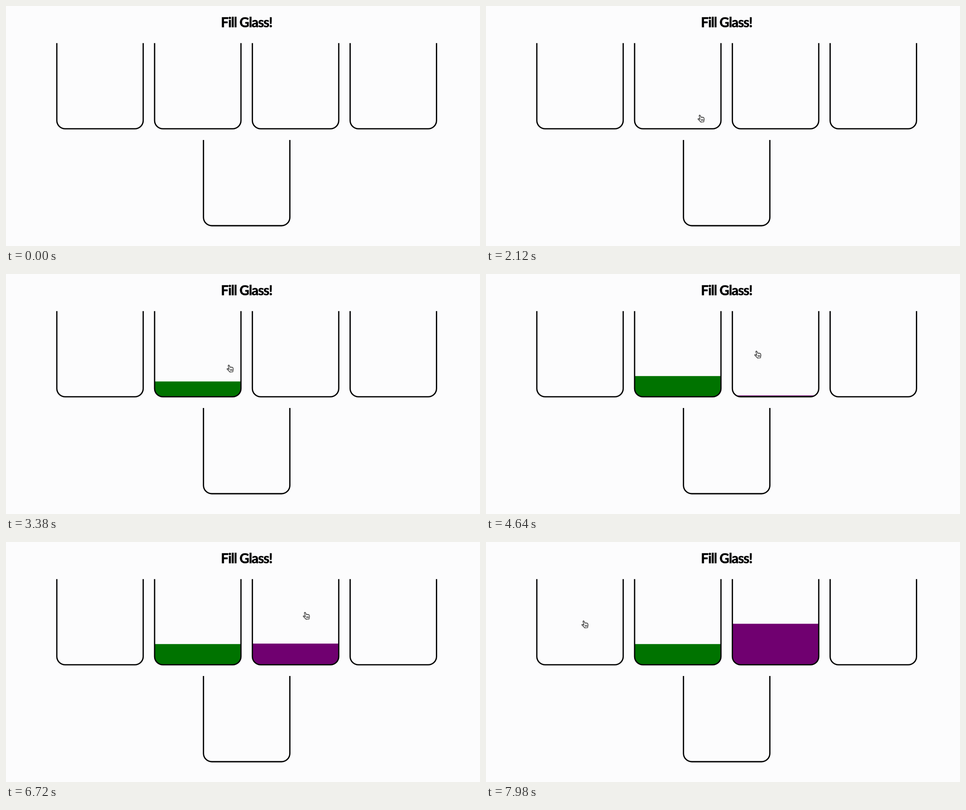
Animation of 1053 by 532 pixels, one loop 8000 ms. Source, as an HTML page:

```html
<!DOCTYPE html>
<html lang="en">
<head>
<meta charset="utf-8">
<title>Fill Glass!</title>
<style>
  html, body { margin: 0; width: 100%; height: 100%; overflow: hidden; background: #fcfcfd; }
  svg { display: block; width: 1053px; height: 532px; }
  .title {
    font: 700 30px Lato, "Open Sans", sans-serif;
    letter-spacing: -1.1px;
    text-anchor: middle;
    stroke: #000;
    stroke-width: .7px;
  }
  .glass { fill: none; stroke: #000; stroke-width: 2.8px; }
  .liquid, .hand { animation: 8s linear infinite; }
  .green { fill: #007300; animation-name: pour-green; }
  .purple { fill: #700070; animation-name: pour-purple; }
  .hand {
    fill: #fff;
    stroke: #000;
    stroke-width: 1.15px;
    stroke-linejoin: round;
    stroke-linecap: round;
    animation-name: wander;
  }

  @keyframes pour-green {
    0%, 33.4% { transform: translateY(0); }
    42.25% { transform: translateY(-34px); }
    45.5%, 100% { transform: translateY(-46px); }
  }
  @keyframes pour-purple {
    0%, 57.4% { transform: translateY(0); }
    58% { transform: translateY(-3px); }
    66.75% { transform: translateY(-40px); }
    68.5%, 83.8% { transform: translateY(-46px); }
    84% { transform: translateY(-47px); }
    94.5%, 100% { transform: translateY(-91px); }
  }
  @keyframes wander {
    0%, 15.9% { transform: translate(642px, 534px); }
    26% { transform: translate(476px, 254px); }
    26.5%, 27.5% { transform: translate(470px, 241px); }
    31.5%, 33.5% { transform: translate(447px, 193px); }
    42.25% { transform: translate(490px, 201px); }
    43.5% { transform: translate(500px, 199px); }
    52.75%, 59.25% { transform: translate(596px, 170px); }
    66.75% { transform: translate(818px, 209px); }
    68% { transform: translate(901px, 222px); }
    75.5%, 84% { transform: translate(660px, 155px); }
    93% { transform: translate(243px, 180px); }
    99.75%, 100% { transform: translate(212px, 174px); }
  }
</style>
</head>
<body>
<svg viewBox="0 0 1053 532">
  <defs>
    <path id="glass" d="M0 0V171.5A18.5 18.5 0 0 0 18.5 190H173.4A18.5 18.5 0 0 0 191.9 171.5V0"/>
    <clipPath id="inside"><use href="#glass"/></clipPath>
  </defs>

  <text class="title" x="534.5" y="46.5">Fill Glass!</text>

  <g transform="translate(330.1 82.2)" clip-path="url(#inside)">
    <rect class="liquid green" y="190" width="192" height="190"/>
  </g>
  <g transform="translate(547.3 82.2)" clip-path="url(#inside)">
    <rect class="liquid purple" y="190" width="192" height="190"/>
  </g>

  <g class="glass">
    <use href="#glass" x="112.9" y="82.2"/>
    <use href="#glass" x="330.1" y="82.2"/>
    <use href="#glass" x="547.3" y="82.2"/>
    <use href="#glass" x="764.5" y="82.2"/>
    <use href="#glass" x="438.7" y="297"/>
  </g>

  <g class="hand">
    <path d="M3.6 2.6C3 1 5 .2 5.8 1.6L7.8 6C8.2 5 9.4 5 9.8 5.9C10.3 5 11.5 5.2 11.8 6.1C12.4 5.5 13.6 5.8 13.9 6.8C15 9 14.9 11 14.2 13L13.8 16L7.2 16.4C6 14 3.2 12.4 1.2 10.2C.6 9 1.8 8.2 3 9L5.6 10.4Z"/>
    <path d="M8.4 10v3.4M10.3 10v3.4M12.2 10v3.4" stroke-width=".9"/>
  </g>
</svg>
</body>
</html>
```
